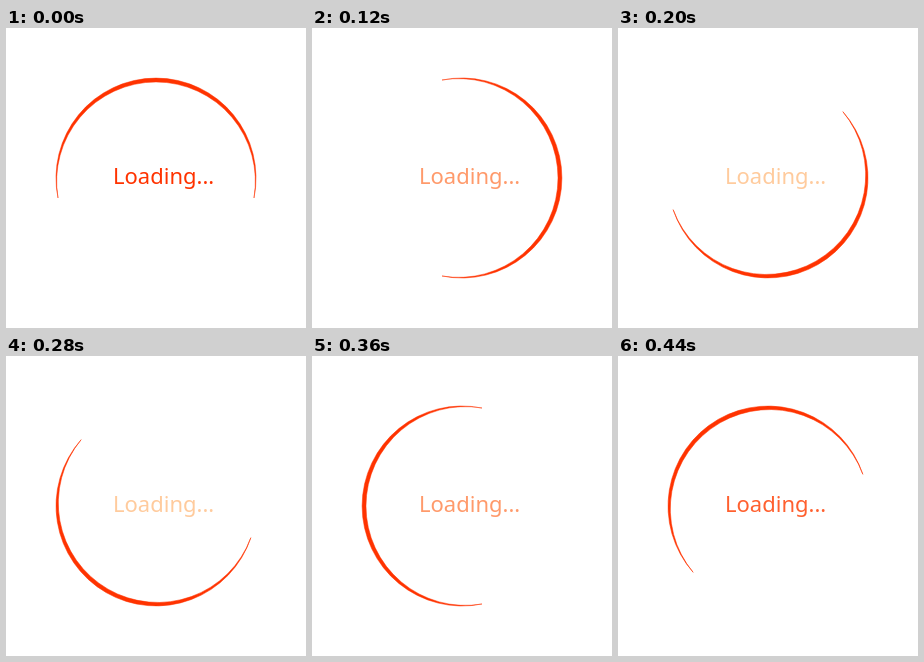
An HTML page for the animation above (480 ms loop, 300x300 px).

```html
<!DOCTYPE html>
<html lang="en">
<head>
<meta charset="utf-8">
<title>Loading</title>
<style>
  html, body { margin: 0; width: 100%; height: 100%; overflow: hidden; background: #fff; }
  svg { display: block; width: 100vw; height: 100vh; }
  path { fill: #f30; stroke: #f30; stroke-width: 0.5; stroke-linejoin: round; }
  text { font: 22px "Noto Sans", sans-serif; }
</style>
</head>
<body>
<svg viewBox="0 0 300 300">
  <!-- Crescent between two circles of slightly different centre and radius -->
  <path id="arc" d="M52 170A100 100 0 1 1 248 170A99.4 99.4 0 1 0 52 170Z"/>
  <text id="label" x="107" y="156">Loading...</text>
</svg>
<script>
  const STEPS = 12, STEP_MS = 40;
  const BRIGHT = [255, 51, 0], PALE = [255, 225, 180];
  const arc = document.getElementById('arc');
  const label = document.getElementById('label');

  function draw() {
    const step = Math.floor(performance.now() / STEP_MS) % STEPS;
    const fade = (1 - Math.abs(1 - 2 * step / STEPS)) ** 0.75;
    const color = BRIGHT.map((c, i) => c + (PALE[i] - c) * fade);
    arc.setAttribute('transform', `rotate(${step * 360 / STEPS} 150 150)`);
    label.setAttribute('fill', `rgb(${color})`);
    requestAnimationFrame(draw);
  }
  draw();
</script>
</body>
</html>
```
